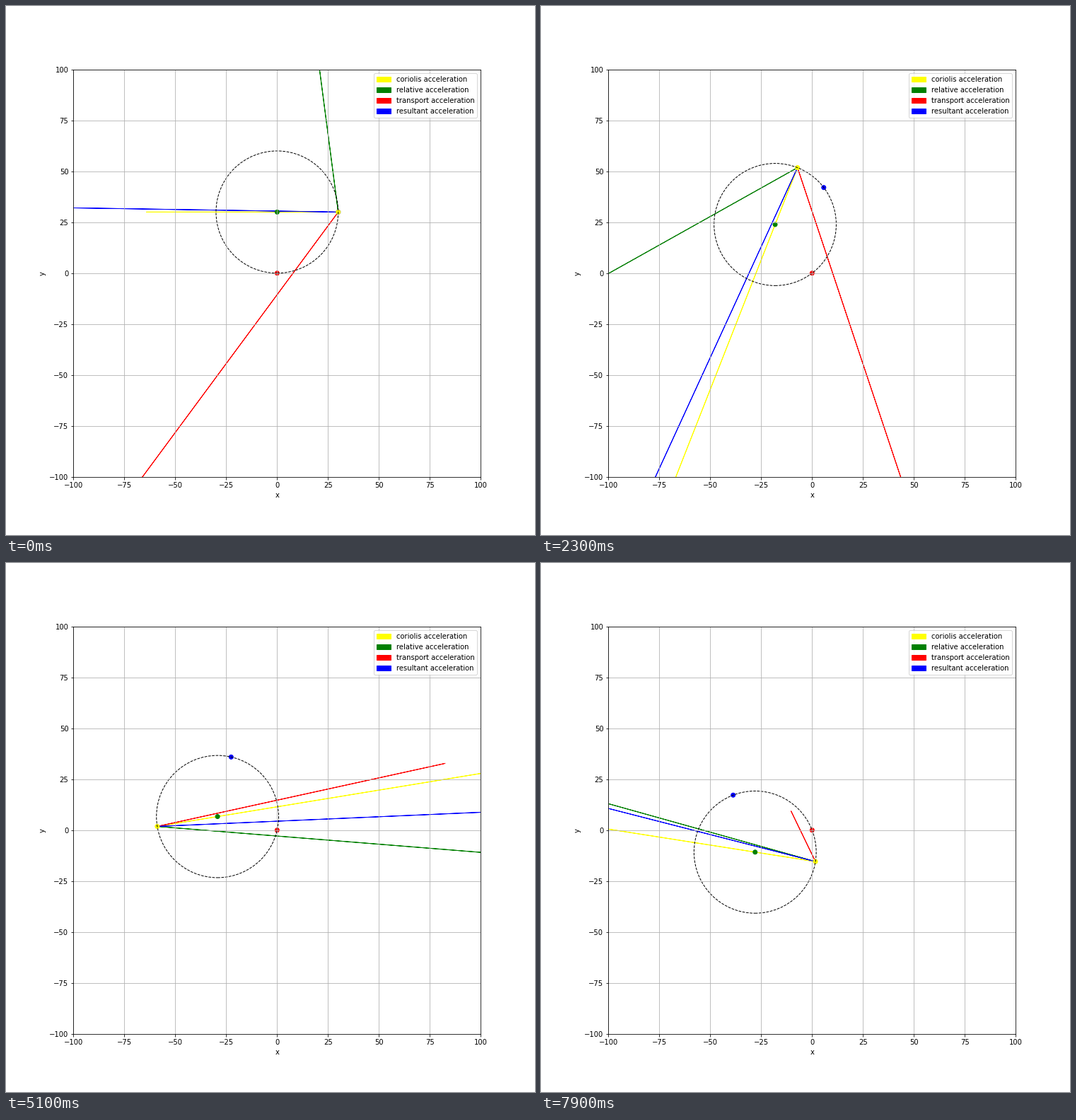
Write a matplotlib script that moves like this. It is 748x748 px and loops after 8 s.

```python
import numpy as np
import matplotlib.pyplot as plt
from matplotlib.animation import FuncAnimation
from matplotlib.patches import Circle, Patch

SIZE, DPI = 748, 72
FRAMES, INTERVAL = 80, 100
DT = 0.0149                            # simulated seconds per frame

R = 30                                 # disc radius, also its distance from the pivot
OMEGA, ALPHA = 2.0, -0.6               # disc about the pivot
SPIN, SPIN_ACC = np.pi / 4, 1.5 * np.pi  # point along the rim

NAMES = {"coriolis": "yellow", "relative": "green",
         "transport": "red", "resultant": "blue"}

# Legend places in order of preference, as signs of the free direction
PLACES = {"upper right": (1, 1), "upper left": (-1, 1),
          "lower left": (-1, -1), "lower right": (1, -1),
          "center right": (1, 0), "center left": (-1, 0),
          "lower center": (0, -1), "upper center": (0, 1), "center": (0, 0)}
LEG_W, LEG_H, LEG_PAD = 53.4, 22.9, 1.74

fig = plt.figure(figsize=(SIZE / DPI, SIZE / DPI), dpi=DPI)
ax = fig.add_subplot()
ax.set(xlim=(-100, 100), ylim=(-100, 100), xlabel="x", ylabel="y")
ax.set_aspect("equal")
ax.grid(True)

dots = ax.scatter([0] * 4, [0] * 4, c=["red", "green", "blue", "yellow"], zorder=1.1)
rim = ax.add_patch(Circle((0, R), R, fill=False, linestyle="--", zorder=1.2))
legend = ax.legend(
    handles=[Patch(color=c, label=f"{n} acceleration") for n, c in NAMES.items()],
    loc="upper right")
arrows = []


def state(t):
    """Disc centre, reference point, moving point and its accelerations (complex)."""
    w = OMEGA + ALPHA * t
    s = SPIN + SPIN_ACC * t
    turn = np.exp(1j * (OMEGA * t + ALPHA * t**2 / 2))
    radial = R * turn * np.exp(1j * (SPIN * t + SPIN_ACC * t**2 / 2))
    centre = 1j * R * turn
    point = centre + radial
    coriolis = -2 * w * s * radial
    relative = (1j * SPIN_ACC - s**2) * radial
    transport = (1j * ALPHA - w**2) * point
    accs = [coriolis, relative, transport, coriolis + relative + transport]
    return centre, centre + R * turn, point, accs


def crowding(place, boxes):
    """Count the boxes that the legend would overlap at a place."""
    sx, sy = PLACES[place]
    cx = sx * (100 - LEG_PAD - LEG_W / 2)
    cy = sy * (100 - LEG_PAD - LEG_H / 2)
    return sum(x0 < cx + LEG_W / 2 and x1 > cx - LEG_W / 2 and
               y0 < cy + LEG_H / 2 and y1 > cy - LEG_H / 2
               for x0, x1, y0, y1 in boxes)


def update(i):
    centre, ref, point, accs = state(i * DT)

    while arrows:
        arrows.pop().remove()
    boxes = [(centre.real - R, centre.real + R, centre.imag - R, centre.imag + R)]
    for acc, color in zip(accs, NAMES.values()):
        arrows.append(ax.arrow(point.real, point.imag, acc.real, acc.imag,
                               width=0.001, color=color))
        tip = point + acc
        boxes.append((*sorted((point.real, tip.real)),
                      *sorted((point.imag, tip.imag))))

    rim.center = centre.real, centre.imag
    dots.set_offsets([(z.real, z.imag) for z in (0j, centre, ref, point)])
    legend.set_loc(min(PLACES, key=lambda p: crowding(p, boxes)))
    return [*arrows, dots, rim, legend]


anim = FuncAnimation(fig, update, frames=FRAMES, interval=INTERVAL,
                     repeat=True, repeat_delay=0, blit=False)
plt.show()
```
